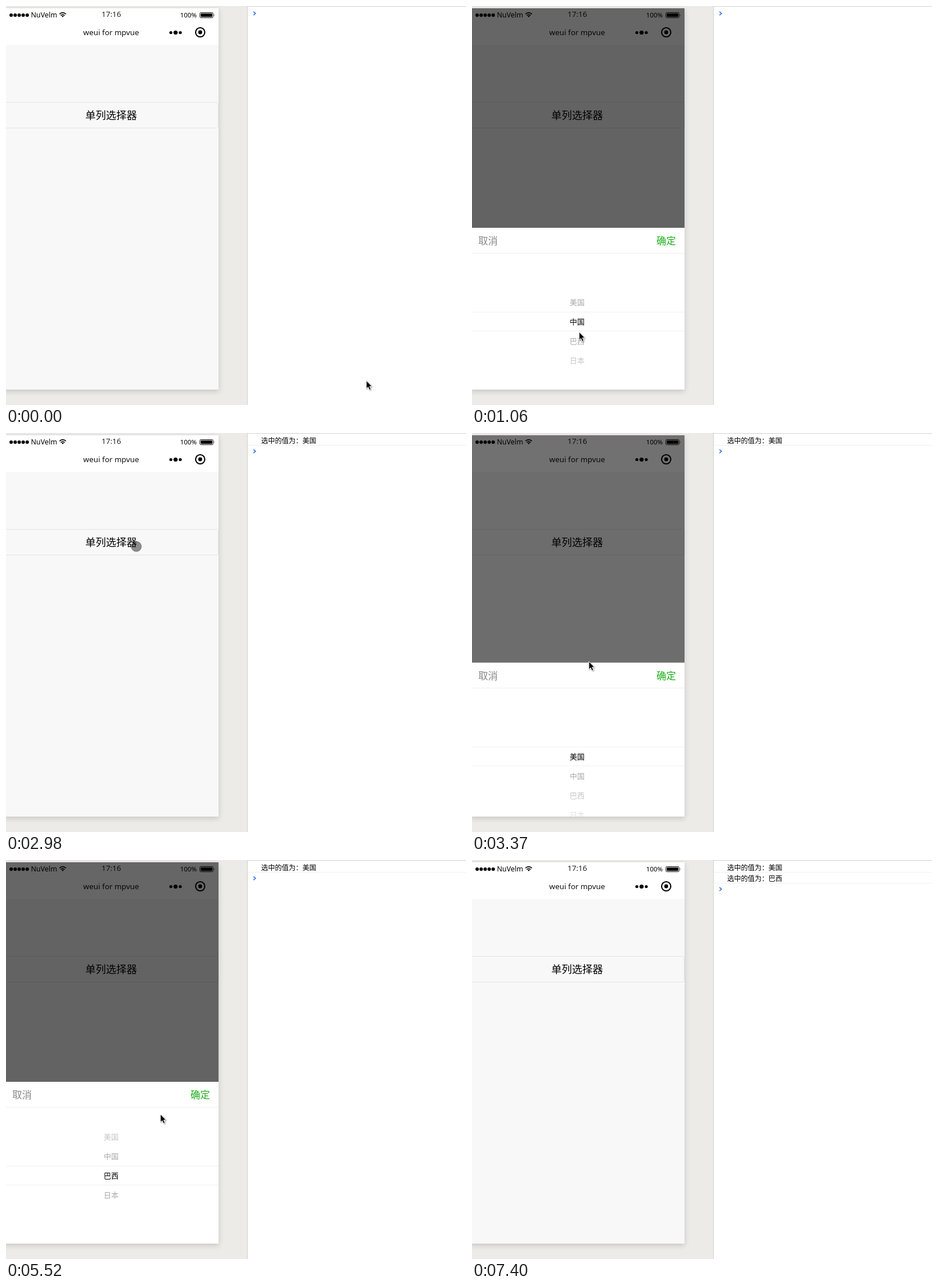
Animation, 803 px wide and 698 px high, one loop 7.8 s. Source, as an HTML page:

```html
<!DOCTYPE html>
<html lang="zh-CN">
<head>
<meta charset="utf-8">
<title>单列选择器</title>
<style>
html, body { margin: 0; width: 100%; height: 100%; overflow: hidden; background: #ecebe7; }
svg { display: block; width: 803px; height: 698px; }
text { font-family: "Noto Sans", "Noto Sans CJK SC", "Noto Sans CJK", sans-serif; }
.cjk { font-family: "Noto Sans CJK SC", "Noto Sans CJK", sans-serif; font-weight: 350; }
.mid { text-anchor: middle; }
.log text { font-size: 12px; }
.phone { filter: drop-shadow(0 3px 5px rgba(0, 0, 0, .16)); }
.item { font-size: 13px; }
</style>
</head>
<body>
<svg viewBox="0 0 803 698">
  <defs>
    <clipPath id="screen"><rect y="4" width="371" height="667"/></clipPath>
    <clipPath id="wheel"><rect y="433" width="371" height="238"/></clipPath>
    <linearGradient id="down" x2="0" y2="1">
      <stop stop-color="#fff" stop-opacity=".95"/><stop offset="1" stop-color="#fff" stop-opacity=".6"/>
    </linearGradient>
    <linearGradient id="up" y1="1" x2="0" y2="0">
      <stop stop-color="#fff" stop-opacity=".95"/><stop offset="1" stop-color="#fff" stop-opacity=".6"/>
    </linearGradient>
  </defs>

  <rect width="803" height="698" fill="#ecebe7"/>
  <rect x="421" width="382" height="698" fill="#fff"/>
  <path d="M421.5 0V698M421 .5H803" stroke="#d0d0d0" fill="none"/>
  <g class="log" id="log"></g>
  <path id="prompt" d="M432 9.8L435.6 13L432 16.2" fill="none" stroke="#3b7de9" stroke-width="1.7"/>

  <rect class="phone" x="-4" y="4" width="375" height="667" fill="#f8f8f8"/>
  <g clip-path="url(#screen)">
    <rect y="4" width="371" height="64" fill="#fff"/>
    <g id="signal"></g>
    <text x="43.5" y="19.5" font-size="12.3">NuVelm</text>
    <g fill="none" stroke="#000" stroke-width="1.6">
      <path d="M93.4 14.2Q99 9 104.6 14.2M95.6 16.6Q99 13.4 102.4 16.6"/>
      <path d="M97 17.6Q99 16 101 17.6L99 19.8Z" fill="#000" stroke="none"/>
    </g>
    <text class="mid" x="183.8" y="19.3" font-size="13.3" fill="#222">17:16</text>
    <text x="304" y="20" font-size="11.4">100%</text>
    <rect x="338.5" y="11.5" width="23" height="9" rx="2" fill="none" stroke="#000"/>
    <rect x="340" y="13" width="20" height="6" rx="1"/>
    <path d="M363 14Q364.6 16 363 18Z"/>
    <text class="mid" x="183.5" y="51" font-size="13.3" fill="#111">weui for mpvue</text>
    <circle cx="287.8" cy="46.5" r="2.6"/><circle cx="296" cy="46.5" r="3.6"/><circle cx="304.2" cy="46.5" r="2.6"/>
    <circle cx="339" cy="46" r="8" fill="none" stroke="#000" stroke-width="2.1"/>
    <circle cx="339" cy="46" r="3.4"/>
    <rect x="-3.5" y="168.5" width="374" height="45" rx="3" fill="#f8f8f8" stroke="#e3e3e3"/>
    <text class="cjk mid" x="183.5" y="198.3" font-size="18">单列选择器</text>

    <rect id="shade" y="4" width="371" height="667"/>
    <g id="sheet">
      <rect y="388" width="371" height="283" fill="#fff"/>
      <text class="cjk" x="11" y="417.4" font-size="17" fill="#888">取消</text>
      <text class="cjk" x="322" y="417.4" font-size="17" fill="#1aad19">确定</text>
      <path d="M0 432.5H371" stroke="#efefef"/>
      <g clip-path="url(#wheel)">
        <g id="items"></g>
        <rect y="433" width="371" height="102" fill="url(#down)"/>
        <rect y="569" width="371" height="102" fill="url(#up)"/>
        <path d="M0 535.5H371M0 568.5H371" stroke="#f1f1f1"/>
      </g>
    </g>
  </g>

  <g id="cursor">
    <g id="arrow" style="filter:drop-shadow(1px 1px 1px rgba(0,0,0,.4))">
      <path d="M0 .4V14.4L3.2 11.5L5.5 16.7L8 15.6L5.8 10.6H10Z" stroke="#fff" stroke-width="1" stroke-linejoin="round"/>
    </g>
    <g id="hand" fill="#fff" stroke="#000" stroke-width="1.2" stroke-linejoin="round">
      <path d="M-1.6 9.5V2Q-1.6 .6 -.1 .6Q1.4 .6 1.4 2V6Q3.6 4.6 4.6 6.2Q6.8 5.3 7.6 7Q9.9 6.8 9.9 9V12L8.2 16.4H.4L-4.2 10.6Q-4.8 8.4 -2.9 8.5Z"/>
      <path d="M2 9.5V13.5M4.4 9.5V13.5M6.8 9.5V13.5" stroke-width=".9"/>
    </g>
    <circle id="dot" r="9" fill="#000" fill-opacity=".43" stroke="#000" stroke-opacity=".25"/>
  </g>
</svg>
<script>
const LOOP = 7800;
const $ = id => document.getElementById(id);
const NS = "http://www.w3.org/2000/svg";

function add(parent, tag, attrs, text) {
  const el = document.createElementNS(NS, tag);
  for (const k in attrs) el.setAttribute(k, attrs[k]);
  if (text) el.textContent = text;
  parent.append(el);
  return el;
}

for (let i = 0; i < 5; i++) add($("signal"), "circle", { cx: 9 + i * 7, cy: 16, r: 3 });
["美国", "中国", "巴西", "日本"].forEach((name, i) =>
  add($("items"), "text", { class: "cjk mid item", x: 183.5, y: 523 + i * 34 }, name));

const logs = ["美国", "巴西"].map((name, i) => {
  const row = add($("log"), "g", { transform: `translate(0 ${i * 19})` });
  add(row, "text", { class: "cjk", x: 445.5, y: 17.5 }, "选中的值为：" + name);
  add(row, "path", { d: "M422 21.5H803", stroke: "#f0f0f0" });
  return row;
});

// Bursts of activity: first change, last change, number of steps
const bursts = [
  [70, 520, 7], [670, 1060, 6], [1290, 1290, 1], [1440, 2210, 11],
  [2290, 2980, 10], [3210, 3820, 9], [4050, 4820, 11], [4900, 4900, 1],
  [5370, 5910, 8], [6140, 6140, 1], [6290, 6850, 8], [7000, 7400, 6]
];

// Pointer: time, x, y, shape from that time on
const pointer = [
  [0, 629, 655, "arrow"], [300, 400, 330, "arrow"], [515, 264, 189, "hand"],
  [665, 264, 189, "dot"], [740, 258, 215, "arrow"], [900, 215, 420, "arrow"],
  [1060, 187, 570, "arrow"], [1285, 187, 570, "hand"], [1435, 187, 572, "dot"],
  [1820, 189, 599, "arrow"], [1960, 205, 575, "arrow"], [2210, 300, 444, "arrow"],
  [2360, 338, 408, "hand"], [2435, 338, 408, "dot"], [2515, 339, 404, "arrow"],
  [2900, 230, 205, "arrow"], [2975, 227.5, 198.5, "dot"], [3200, 227, 200, "arrow"],
  [3362, 204, 399, "arrow"], [3600, 186, 505, "arrow"], [3820, 183, 525, "arrow"],
  [4045, 183, 525, "dot"], [4440, 181, 492, "arrow"], [4510, 179, 481, "arrow"],
  [5300, 179, 481, "arrow"], [5600, 300, 432, "arrow"], [5760, 364, 408, "arrow"],
  [5905, 342, 399, "hand"], [6200, 342, 399, "arrow"], [6450, 262, 414, "arrow"],
  [6620, 246, 345, "arrow"], [6845, 211, 197, "hand"], [6950, 211, 197, "arrow"],
  [7320, 670, 684, "arrow"], [7390, 680, 720, "none"]
];

const openings = [[722, 2515], [3152, 6140]];
// Wheel drags: press, release, settled, start offset, release offset, end offset
const drags = [[1440, 1820, 2140, 0, 27, 34], [4050, 4440, 4890, 34, 1, -34]];
const logTimes = [2515, 6140];

const clamp = v => Math.min(1, Math.max(0, v));
const mix = (a, b, u) => a + (b - a) * u;

// CSS "ease": cubic-bezier(.25, .1, .25, 1)
function ease(x) {
  x = clamp(x);
  let lo = 0, hi = 1;
  for (let i = 0; i < 20; i++) {
    const m = (lo + hi) / 2;
    if (.75 * m * (1 - m) + m ** 3 < x) lo = m; else hi = m;
  }
  return .3 * lo * (1 - lo) ** 2 + 3 * lo * lo * (1 - lo) + lo ** 3;
}

function snapTime(t) {
  let held = 0;
  for (const [from, to, steps] of bursts) {
    if (t < from) break;
    const gap = steps > 1 ? (to - from) / (steps - 1) : 0;
    held = gap ? Math.min(to, from + Math.floor((t - from + 5) / gap) * gap) : from;
  }
  return held;
}

function pointerAt(t) {
  let i = 0;
  while (i < pointer.length - 1 && pointer[i + 1][0] <= t) i++;
  const a = pointer[i], b = pointer[i + 1] || a;
  const u = b === a ? 0 : (t - a[0]) / (b[0] - a[0]);
  return [mix(a[1], b[1], u), mix(a[2], b[2], u), a[3]];
}

function wheelAt(t) {
  let pos = 0;
  for (const [press, release, done, a, b, c] of drags) {
    if (t < press) break;
    pos = t < release ? mix(a, b, (t - press) / (release - press))
                      : mix(b, c, ease((t - release) / (done - release)));
  }
  return pos;
}

const show = (el, on) => { el.style.display = on ? "" : "none"; };

function draw(now) {
  const t = snapTime(now % LOOP);

  const open = openings.find(([from, to]) => t >= from && t < to);
  show($("shade"), open);
  show($("sheet"), open);
  if (open) {
    const age = t - open[0];
    $("shade").setAttribute("opacity", .6 * ease(age / 310));
    $("sheet").setAttribute("transform", `translate(0 ${283 * (1 - ease(age / 290))})`);
    $("items").setAttribute("transform", `translate(0 ${wheelAt(t)})`);
  }

  const count = logTimes.filter(at => t >= at).length;
  logs.forEach((row, i) => show(row, i < count));
  $("prompt").setAttribute("transform", `translate(0 ${count * 19})`);

  const [x, y, shape] = pointerAt(t);
  $("cursor").setAttribute("transform", `translate(${x} ${y})`);
  for (const id of ["arrow", "hand", "dot"]) show($(id), id === shape);
}

const start = performance.now();
function frame() {
  draw(performance.now() - start);
  requestAnimationFrame(frame);
}
frame();
</script>
</body>
</html>
```
